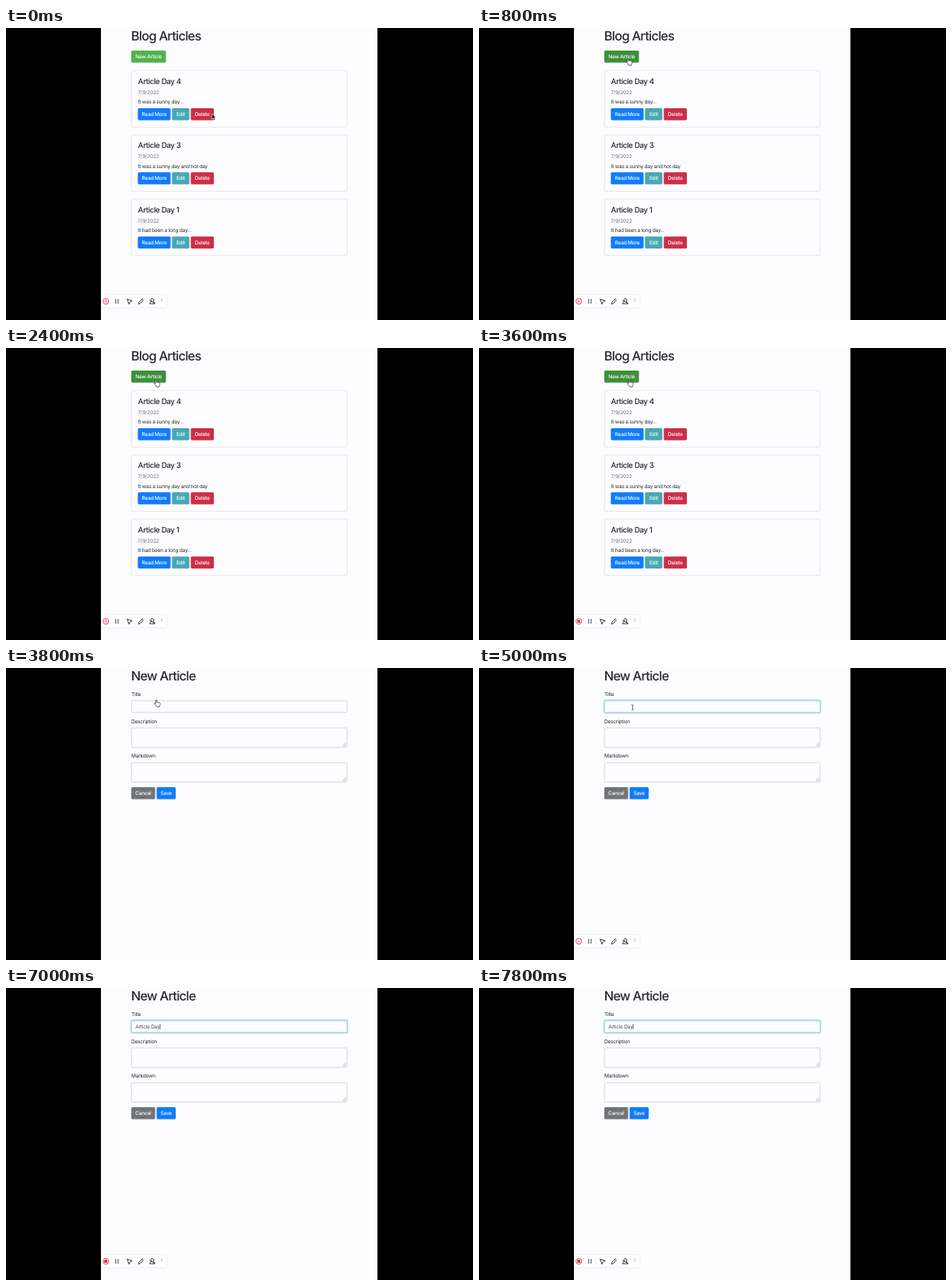
An HTML page that plays this animation: 600 by 375 pixels, repeating every 8000 ms.

```html
<!DOCTYPE html>
<html lang="en">
<head>
<meta charset="utf-8">
<title>Blog Articles</title>
<style>
  html, body { margin: 0; width: 100%; height: 100%; overflow: hidden; background: #000; }
  svg { display: block; width: 100%; height: 100%; }
  text {
    font: 400 6.55px Inter, "Open Sans", sans-serif;
    letter-spacing: -0.033em;
    text-rendering: geometricPrecision;
    fill: #24282c;
    white-space: pre;
  }
  .h1 { font-size: 16.4px; font-weight: 500; letter-spacing: -0.045em; }
  .h4 { font-size: 9.8px; font-weight: 500; letter-spacing: -0.04em; }
  .muted { fill: #6c757d; }
  .btn { fill: #fff; font-weight: 500; text-anchor: middle; }
  .typed { fill: #495057; }
  .box { fill: #fefdff; stroke: #d9dbde; stroke-width: .7; }
  .field { fill: #fefdff; stroke: #c3c8cb; stroke-width: .7; }
  .icon { fill: none; stroke: #26262a; stroke-width: .9; stroke-linejoin: round; stroke-linecap: round; }
</style>
</head>
<body>
<svg id="stage" viewBox="0 0 600 375" preserveAspectRatio="none"></svg>
<script>
const LOOP = 8000, STEP = 200;
const PAGE_SWITCH = 3800, BAR_BACK = 4000, FOCUS = 4600, IBEAM_END = 6400;
const GREEN = '#4fb24c', BLUE = '#117cf9', TEAL = '#47a9b4', RED = '#cc2f48', GRAY = '#6f757c';
const DARK = { new: '#3e8f3b', read: '#0b66d3', edit: '#388b95' };

const text = (x, y, s, cls = '') => `<text x="${x}" y="${y}" class="${cls}">${s}</text>`;

const rect = (x, y, w, h, attrs) =>
  `<rect x="${x}" y="${y}" width="${w}" height="${h}" rx="1.6" ${attrs}/>`;

const button = (x, y, w, label, color, id = '') =>
  rect(x, y, w, 15.5, `fill="${color}" id="${id}"`) + text(x + w / 2, y + 10.1, label, 'btn');

const card = (y, title, body, first) => `
  ${rect(161.2, y, 277, 72.3, 'class="box"')}
  ${text(169.6, y + 17.1, title, 'h4')}
  ${text(169.6, y + 29.8, '7/9/2022', 'muted')}
  ${text(169.6, y + 42.4, body)}
  ${button(169.4, y + 48, 42.1, 'Read More', BLUE, first ? 'read' : '')}
  ${button(213.2, y + 48, 22.4, 'Edit', TEAL, first ? 'edit' : '')}
  ${button(237.4, y + 48, 29.7, 'Delete', RED)}`;

const area = y => rect(161.2, y, 277, 25, 'class="field"') +
  `<path d="M432.6 ${y + 23.6}l4.2-4.2M435 ${y + 23.8}l2-2" stroke="#777" stroke-width=".6"/>`;

const list = `<g id="list">
  ${text(160.8, 15.9, 'Blog Articles', 'h1')}
  ${button(161, 29, 44.5, 'New Article', GREEN, 'new')}
  ${card(54.9, 'Article Day 4', 'It was a sunny day...', true)}
  ${card(137.3, 'Article Day 3', 'It was a sunny day and hot day')}
  ${card(219.7, 'Article Day 1', 'It had been a long day...')}
</g>`;

const form = `<g id="form">
  ${text(160.8, 15.9, 'New Article', 'h1')}
  ${text(161, 36.1, 'Title')}
  ${rect(160.5, 41.3, 278.4, 16.4, 'id="glow" fill="none" stroke="#b5d8fc" stroke-width="1.5"')}
  ${rect(161.2, 42, 277, 15, 'class="field" id="input"')}
  ${text(166.2, 52, '', 'typed')}
  <path id="caret" d="M0 46.3v6.6" stroke="#222" stroke-width=".7"/>
  ${text(161, 70.8, 'Description')}
  ${area(77)}
  ${text(161, 115.4, 'Markdown')}
  ${area(121.6)}
  ${button(161, 153, 30.6, 'Cancel', GRAY)}
  ${button(193.5, 153, 24.5, 'Save', BLUE)}
</g>`;

const bar = `<g id="bar">
  <rect x="112" y="343" width="94.3" height="15.6" rx="2.5" fill="#fff" filter="url(#soft)"/>
  <circle cx="128.2" cy="351" r="3.7" fill="#fff" stroke="#d8344a" stroke-width=".9"/>
  <rect id="rec" x="126.2" y="349" width="4" height="4" rx=".7" fill="#d8203a"/>
  <path class="icon" d="M140.9 348.4v5.2M144 348.4v5.2" stroke-width="1.2"/>
  <path d="M150.6 346v10" stroke="#e6e6ea" stroke-width=".6"/>
  <path class="icon" d="M156 348.2l6.2 2.3-2.8 1.1-1.2 2.8z"/>
  <path class="icon" d="M170.3 354.2l.6-2.2 4.2-4.1 1.5 1.5-4.2 4.2z"/>
  <path class="icon" d="M184.6 354.1h6.6M185 353.6c0-1.6 1-1.9 1.9-2.2-1.5-1.5-.8-3.8 1.1-3.8s2.6 2.3 1.1 3.8c.9.3 1.9.6 1.9 2.2M185 350l5.8 3.6"/>
  <path d="M201 347l-1.8 2.1 1.8 2.1" fill="none" stroke="#85858a" stroke-width=".6"/>
</g>`;

// Each pointer is drawn around its hot spot at 0,0.
const pointers = `
  <path id="arrow" d="M0 0v7.4l1.7-1.5 1.2 2.7 1.3-.6-1.2-2.6h2.3z" fill="#111" stroke="#fff" stroke-width=".6"/>
  <path id="hand" d="M-1 .6c0-1 1.4-1 1.5 0v2.5c.3-.6 1.4-.5 1.5.2.4-.5 1.3-.3 1.4.3.5-.3 1.3 0 1.3.7 0 2-.3 2.6-.9 3.8v.8h-3.6v-.7C-.7 7-1.6 5.900-2.700 4.700c-.4-.8.6-1.300 1.200-.7l.5.6z" fill="#fff" stroke="#222" stroke-width=".7" stroke-linejoin="round"/>
  <path id="beam" d="M-1.400-3.300q1.400 0 1.400.8 0-.8 1.400-.8M0-2.500v5M-1.400 3.300q1.400 0 1.400-.8 0 .8 1.400.8" fill="none" stroke="#333" stroke-width=".7"/>`;

const stage = document.getElementById('stage');
stage.innerHTML = `
  <defs>
    <clipPath id="clip"><rect x="122" width="355.5" height="375"/></clipPath>
    <filter id="soft" x="-10%" y="-40%" width="120%" height="180%">
      <feDropShadow dx="0" dy=".3" stdDeviation="1" flood-opacity=".16"/>
    </filter>
  </defs>
  <rect width="600" height="375"/>
  <g clip-path="url(#clip)">
    <rect x="122" width="355.5" height="375" fill="#fdfcfe"/>
    ${list}${form}${bar}${pointers}
  </g>`;

const $ = id => document.getElementById(id);
const typed = stage.querySelector('.typed');
const show = (id, on) => $(id).setAttribute('display', on ? 'inline' : 'none');

// Pointer stops: time, x, y
const path = [
  [0, 264.4, 109.8], [200, 258, 98], [600, 212, 54], [800, 192, 39], [1000, 190, 40],
  [1400, 184.6, 115.6], [1600, 186, 115.4], [1800, 222, 112], [2000, 247, 88],
  [2400, 193, 41], [3800, 193.4, 41], [4200, 197.4, 50.8], [LOOP, 197.4, 50.8]
];

function pointerAt(t) {
  const i = path.findIndex(p => p[0] > t);
  const [a, b] = [path[i - 1], path[i]];
  const k = (t - a[0]) / (b[0] - a[0]);
  return [a[1] + (b[1] - a[1]) * k, a[2] + (b[2] - a[2]) * k];
}

const keyTimes = [5300, 5450, 5600, 5750, 5900, 6000, 6200, 6400, 6600, 6800, 7000];
const phrase = 'Article Day';
const hot = { new: [161, 29, 205.5, 44.5, GREEN], read: [169.4, 103, 211.5, 118.5, BLUE], edit: [213.2, 103, 235.6, 118.5, TEAL] };

function draw(t) {
  const onForm = t >= PAGE_SWITCH;
  const [x, y] = pointerAt(t);
  show('list', !onForm);
  show('form', onForm);
  show('bar', !onForm || t >= BAR_BACK);

  let over = false;
  for (const id in hot) {
    const [l, top, r, b, color] = hot[id];
    const inside = !onForm && x > l && x < r && y > top && y < b;
    $(id).setAttribute('fill', inside ? DARK[id] : color);
    over = over || inside;
  }

  const beam = t >= BAR_BACK;
  const hand = over || (onForm && !beam);
  show('arrow', !hand && !beam);
  show('hand', hand);
  show('beam', beam && t < IBEAM_END);
  for (const id of ['arrow', 'hand', 'beam']) $(id).setAttribute('transform', `translate(${x} ${y})`);

  const focused = t >= FOCUS;
  show('glow', focused);
  $('input').style.stroke = focused ? '#80bcf8' : '';
  typed.textContent = phrase.slice(0, keyTimes.filter(k => k <= t).length);
  show('caret', t >= 5200);
  if (onForm) $('caret').setAttribute('transform', `translate(${166.6 + typed.getComputedTextLength()} 0)`);

  const pulse = .5 + .5 * Math.cos(2 * Math.PI * (t / 800 - .65));
  $('rec').setAttribute('opacity', .15 + .85 * pulse);
}

const start = performance.now();
function tick() {
  const t = (performance.now() - start) % LOOP;
  draw(Math.floor(t / STEP) * STEP);
  requestAnimationFrame(tick);
}
tick();
</script>
</body>
</html>
```
